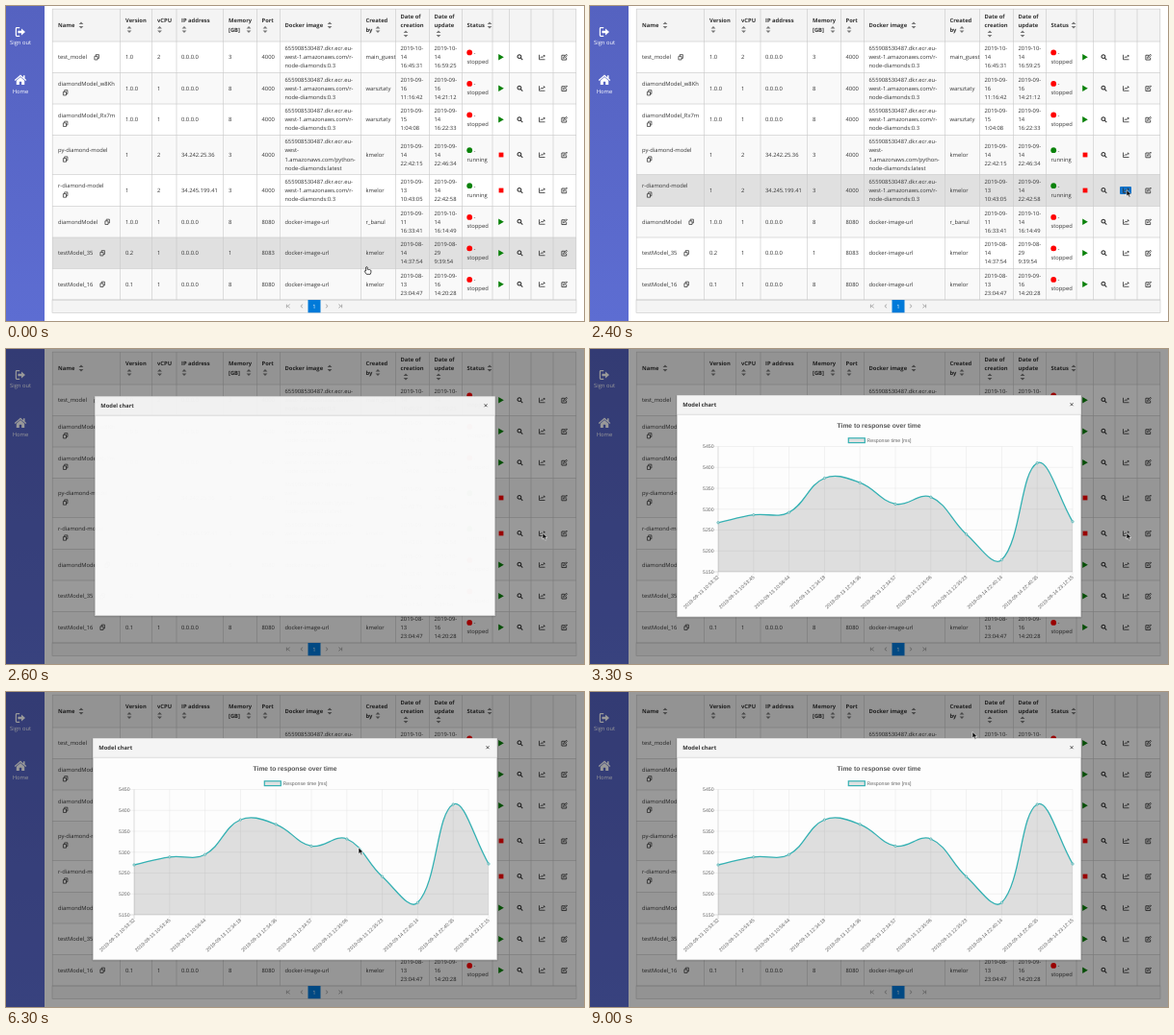
Animation, 600 px wide and 328 px high, one loop 9100 ms. Source, as an HTML page:

```html
<!DOCTYPE html>
<html lang="en">
<head>
<meta charset="utf-8">
<title>Model table and chart</title>
<style>
html, body { margin: 0; width: 600px; height: 328px; overflow: hidden; background: #fff; }
svg { display: block; }
text { font-family: "Open Sans", sans-serif; font-size: 5.8px; fill: #333; text-rendering: geometricPrecision; white-space: pre; }
.b { font-weight: 700; }
.w { fill: #fff; }
.c { text-anchor: middle; }
.e { text-anchor: end; }
.chart text { font-family: "Liberation Sans", Arial, sans-serif; font-size: 5.2px; fill: #666; }
.chart .title { font-size: 6.7px; font-weight: 700; fill: #555; }
.chart .tip text { fill: #fff; }
</style>
</head>
<body>
<svg id="stage" width="600" height="328" viewBox="0 0 600 328">
  <defs>
    <linearGradient id="side" x1="0" y1="0" x2="0" y2="1">
      <stop offset="0" stop-color="#5562c0"/><stop offset="1" stop-color="#5d6dd2"/>
    </linearGradient>
  </defs>
</svg>
<script>
const NS = "http://www.w3.org/2000/svg";
const stage = document.getElementById("stage");
const LOOP = 9100, STEP = 100;
const LINE = "#c8c8c8", INK = "#333", TEAL = "#35b1b3";

function add(parent, tag, attrs = {}, content) {
  const el = document.createElementNS(NS, tag);
  for (const k in attrs) el.setAttribute(k, attrs[k]);
  if (content !== undefined) el.textContent = content;
  parent.appendChild(el);
  return el;
}
const group = (p, a) => add(p, "g", a);
const rect = (p, x, y, width, height, fill, more) => add(p, "rect", { x, y, width, height, fill, ...more });
const line = (p, x1, y1, x2, y2, stroke = LINE, w = 0.6) =>
  add(p, "line", { x1, y1, x2, y2, stroke, "stroke-width": w });
// y is the visual middle of the line of text
const text = (p, x, y, s, cls = "") => add(p, "text", { x, y: y + 2, class: cls }, s);
const lines = (p, x, y, list, cls) =>
  list.forEach((s, i) => text(p, x, y + (i - (list.length - 1) / 2) * 9.1, s, cls));

const ICONS = {
  sort: ["M-2.4-.9 0-3.4 2.4-.9zM-2.4.9 0 3.4 2.4.9z", "#777"],
  copy: ["M-2.1-.9H1V2.7H-2.1zM-.8-.9V-2.6H2.4V1.2H1", INK, 0.75],
  search: ["M-2.5-.6A1.9 1.9 0 1 1 1.3-.6 1.9 1.9 0 1 1-2.5-.6zM.8.8 2.8 2.8", INK, 1.05],
  chart: ["M-3-2.5V2.5H3M-2 1-.5-.6.6.4 2.5-1.7M1.2-1.8H2.5V-.5", INK, 0.8],
  edit: ["M.5-2H-2.6V2.8H2.2V.4M-.9 1.1-.7-.1 2.1-2.9 3-2 .2.8z", INK, 0.85],
  play: ["M-2.8-3.2 2.8 0-2.8 3.2z", "#0a820a"],
  stop: ["M-2.4-2.4H2.4V2.4H-2.4z", "#f00"],
  first: ["M-1.6-1.8V1.8M1.6-1.8-.6 0 1.6 1.8", "#888", 0.7],
  prev: ["M1.1-1.8-1.1 0 1.1 1.8", "#888", 0.7],
  next: ["M-1.1-1.8 1.1 0-1.1 1.8", "#888", 0.7],
  last: ["M1.6-1.8V1.8M-1.6-1.8.6 0-1.6 1.8", "#888", 0.7],
  exit: ["M-.8-4.4H-3.8Q-4.6-4.4-4.6-3.6V3.6Q-4.6 4.4-3.8 4.4H-.8", "#fff", 1.2],
  arrow: ["M-2.6-1.2H1V-3.6L5 0 1 3.6V1.2H-2.6z", "#fff"],
  home: ["M0-5.4 6.2 0 5.4.9 0-3.8-5.4.9-6.2 0zM3-4.8H4.5V-1.5L3-2.8zM-4.2.8 0-2.9 4.2.8V5H1.2V1.8H-1.2V5H-4.2z", "#fff"],
  close: ["M-1.5-1.5 1.5 1.5M1.5-1.5-1.5 1.5", "#555", 1]
};
function icon(p, name, x, y) {
  const [d, color, w] = ICONS[name];
  const paint = w ? { fill: "none", stroke: color, "stroke-width": w } : { fill: color };
  return add(p, "path", { d, transform: `translate(${x} ${y})`, ...paint });
}

// ---- page ----
const page = group(stage);
rect(page, 0, 0, 600, 328, "#fff");
rect(page, 0, 0, 40, 328, "url(#side)");
icon(page, "exit", 15, 27);
icon(page, "arrow", 15, 27);
text(page, 15, 38, "Sign out", "w c");
icon(page, "home", 15, 77);
text(page, 15, 89, "Home", "w c");

const HEAD = [
  [54, ["Name"], 78, 20], [124, ["Version", ""], 128, 24.5], [157, ["vCPU", ""], 159.5, 24.5],
  [182, ["IP address", ""], 185, 24.5], [231, ["Memory", "[GB]"], 252, 24.5], [265.5, ["Port", ""], 269, 24.5],
  [289.5, ["Docker image"], 336, 20], [373.5, ["Created", "by"], 386, 24.5],
  [409.5, ["Date of", "creation", ""], 415, 29], [444.5, ["Date of", "update", ""], 449, 29],
  [478.5, ["Status"], 502, 20]
];
const REPO = ["655908530487.dkr.ecr.eu-", "west-1.amazonaws.com/r-", "node-diamonds:0.3"];
const PY = ["655908530487.dkr.ecr.eu-", "west-", "1.amazonaws.com/python-", "node-diamonds:latest"];
const URL_ONLY = ["docker-image-url"];
// name, copy icon x (0 = below), version, vCPU, IP, memory, port, image, author, created, updated, running
const ROWS = [
  ["test_model", 94, "1.0", 2, "0.0.0.0", 3, 4000, REPO, "main_guest", "2019-10- 14 16:45:31", "2019-10- 14 16:59:25"],
  ["diamondModel_w8Kh", 0, "1.0.0", 1, "0.0.0.0", 8, 4000, REPO, "warsztaty", "2019-09- 16 11:16:42", "2019-09- 16 14:21:12"],
  ["diamondModel_Rx7m", 0, "1.0.0", 1, "0.0.0.0", 8, 4000, REPO, "warsztaty", "2019-09- 15 1:04:08", "2019-09- 14 16:22:33"],
  ["py-diamond-model", 0, "1", 2, "34.242.25.36", 3, 4000, PY, "kmelor", "2019-09- 14 22:42:15", "2019-09- 14 22:46:34", true],
  ["r-diamond-model", 0, "1", 2, "34.245.199.41", 3, 4000, REPO, "kmelor", "2019-09- 13 10:43:05", "2019-09- 14 22:42:58", true],
  ["diamondModel", 105, "1.0.0", 1, "0.0.0.0", 8, 8080, URL_ONLY, "r_banul", "2019-09- 11 16:33:41", "2019-10- 14 16:14:49"],
  ["testModel_35", 100, "0.2", 1, "0.0.0.0", 1, 8083, URL_ONLY, "kmelor", "2019-08- 14 14:37:54", "2019-08- 29 9:39:54"],
  ["testModel_16", 100, "0.1", 1, "0.0.0.0", 8, 8080, URL_ONLY, "kmelor", "2019-08- 13 23:04:47", "2019-09- 16 14:20:28"]
];
const EDGES = [37, 69.5, 102, 134.5, 175.5, 208.5, 241, 273.5, 306];
const COLS = [48.3, 118.5, 151.5, 177, 225.5, 260.5, 284.5, 368.5, 404.5, 439.5, 473.5, 505, 522.5, 545, 568, 591.7];

rect(page, 48, 3, 544, 34, "#f4f4f4");
const bands = ROWS.map((r, i) => rect(page, 48, EDGES[i], 544, EDGES[i + 1] - EDGES[i], "#fff"));
const button = rect(page, 550, 188, 12, 8, "#1272c8", { rx: 1 });
rect(page, 48, 306, 544, 13.3, "#f4f4f4", { stroke: LINE, "stroke-width": 0.6 });
COLS.forEach(x => line(page, x, 3, x, 306));
[3.2, ...EDGES].forEach(y => line(page, 48, y, 592, y));

for (const [x, words, ix, iy] of HEAD) {
  lines(page, x, 20, words, "b");
  icon(page, "sort", ix, iy);
}
ROWS.forEach(([name, copyX, ver, cpu, ip, mem, port, image, who, made, changed, on], i) => {
  const y = (EDGES[i] + EDGES[i + 1]) / 2;
  lines(page, 54, y, copyX ? [name] : [name, ""]);
  icon(page, "copy", copyX || 61.5, copyX ? y : y + 4.5);
  [[124, ver], [157, cpu], [182, ip], [231, mem], [265.5, port], [373.5, who]]
    .forEach(([x, s]) => text(page, x, y, s));
  lines(page, 289.5, y, image);
  lines(page, 409.5, y, made.split(" "));
  lines(page, 444.5, y, changed.split(" "));
  add(page, "circle", { cx: 481.2, cy: y - 4.8, r: 2.9, fill: on ? "#0a820a" : "#f00" });
  lines(page, 478.5, y, ["", on ? "running" : "stopped"]);
  text(page, 485.6, y - 4.5, "-");
  icon(page, on ? "stop" : "play", 514, y);
  icon(page, "search", 533.5, y);
  icon(page, "chart", 556.5, y);
  icon(page, "edit", 579.5, y);
});
icon(page, "first", 293, 312.5);
icon(page, "prev", 307, 312.5);
rect(page, 313.5, 306, 13, 13.3, "#007ad9");
text(page, 320, 312.5, "1", "w c");
icon(page, "next", 333, 312.5);
icon(page, "last", 347, 312.5);

// ---- dialog ----
const mask = rect(stage, 0, 0, 600, 328, "#000", { opacity: 0.4 });
const dialog = group(stage);
rect(dialog, 89.5, 48, 421, 232.5, "#000", { opacity: 0.15, rx: 1 });
rect(dialog, 90.3, 48.3, 419.4, 230.6, "#fdfdfd", { stroke: LINE, "stroke-width": 0.6 });
rect(dialog, 90.6, 48.6, 418.8, 19.6, "#f4f4f4");
line(dialog, 90, 68.3, 510, 68.3);
text(dialog, 96.3, 58.2, "Model chart", "b");
icon(dialog, "close", 500, 57.7);

const chart = group(dialog, { class: "chart" });
const LEFT = 133, RIGHT = 501, TOP = 101.5, BASE = 232;
const STAMPS = ["13 10:53:32", "13 10:53:45", "13 10:56:44", "13 12:34:18", "13 12:34:36", "13 12:34:57",
  "13 12:35:06", "13 12:35:23", "14 22:40:14", "14 22:40:35", "14 23:12:15"];
const LEVELS = [180, 171.8, 169.2, 133, 137.8, 160.4, 153, 192.2, 219.3, 117, 179];
const px = i => LEFT + i * (RIGHT - LEFT) / 10;

text(chart, 300, 80, "Time to response over time", "title c");
rect(chart, 268.3, 92.8, 17, 4.8, "#e0e0e0", { stroke: TEAL, "stroke-width": 1.2 });
text(chart, 287.6, 95, "Response time [ms]");
for (let i = 0; i < 7; i++) {
  const y = TOP + i * (BASE - TOP) / 6;
  line(chart, 129, y, RIGHT, y, i === 6 ? "#bbb" : "#e4e4e4", 0.5);
  text(chart, 128.6, y - 0.2, 5450 - i * 50, "e");
}
STAMPS.forEach((s, i) => {
  line(chart, px(i), TOP, px(i), BASE + 4.3, i ? "#e4e4e4" : "#bbb", 0.5);
  add(chart, "text", { class: "e", y: 1.8, transform: `translate(${px(i)} 236.6) rotate(-43)` }, "2019-09-" + s);
});
const area = add(chart, "path", { fill: "#000", "fill-opacity": 0.12 });
const curve = add(chart, "path", { fill: "none", stroke: TEAL, "stroke-width": 1.3 });
const dots = LEVELS.map((v, i) =>
  add(chart, "circle", { cx: px(i), r: 1.2, fill: "#cfdada", stroke: TEAL, "stroke-width": 0.6 }));

const tip = group(chart, { class: "tip" });
rect(tip, 281, 143.7, 69, 18.6, "#000", { rx: 2.5, opacity: 0.8 });
add(tip, "path", { d: "M350 150.8 352.4 153 350 155.2z", opacity: 0.8 });
text(tip, 283.5, 149.2, "2019-09-13 12:35:06", "b");
rect(tip, 283.8, 154.6, 4.4, 4.4, "#e0e0e0", { stroke: TEAL, "stroke-width": 0.5 });
text(tip, 290, 156.8, "Response time [ms]: 5331");

// cubic spline with tension, handles kept inside the plot
function spline(pts, tension = 0.4) {
  const cap = y => Math.min(BASE, Math.max(TOP, y));
  const handles = pts.map((p, i) => {
    const a = pts[i - 1] || p, b = pts[i + 1] || p;
    const da = Math.hypot(p[0] - a[0], p[1] - a[1]), db = Math.hypot(b[0] - p[0], b[1] - p[1]);
    const at = k => [p[0] + k * (b[0] - a[0]), cap(p[1] + k * (b[1] - a[1]))];
    return [at(-tension * da / (da + db)), at(tension * db / (da + db))];
  });
  return pts.map((p, i) => i ? `C${handles[i - 1][1]} ${handles[i][0]} ${p}` : `M${p}`).join("");
}
function plot(k) {
  const pts = LEVELS.map((v, i) => [px(i), BASE + (v - BASE) * k]);
  const d = spline(pts);
  curve.setAttribute("d", d);
  area.setAttribute("d", `${d}L${RIGHT} ${BASE}L${LEFT} ${BASE}Z`);
  dots.forEach((c, i) => c.setAttribute("cy", pts[i][1]));
}

// ---- pointer ----
const pointer = group(stage);
const arrow = add(pointer, "path", {
  d: "M0 0V6.6L1.6 5.2 2.7 7.7 3.9 7.2 2.8 4.8H4.9z", fill: "#000", stroke: "#fff", "stroke-width": 0.6
});
const hand = add(pointer, "path", {
  d: "M-.9.2Q0-.8.7.2V2.5Q1.6 2 2.1 2.8 3 2.3 3.4 3.1 4.4 2.9 4.4 4V5.5L3.7 7.5H-.2L-2.2 4.7Q-2.3 3.4-.9 4.2z",
  fill: "#fff", stroke: "#000", "stroke-width": 0.7, "stroke-linejoin": "round"
});
// time, x, y
const PATH = [
  [0, 374.5, 271.8], [1000, 512, 205], [1100, 513.5, 204.5], [1300, 513.5, 204.5], [2000, 557, 191.5],
  [3300, 557, 191.5], [4000, 414, 206], [4400, 399, 189], [5200, 399, 189], [5600, 392, 194],
  [6300, 366, 162], [6600, 355, 153.5], [8200, 355, 153.5], [9000, 397, 41.5], [LOOP, 397, 41.5]
];
const clamp = v => Math.min(1, Math.max(0, v));
const ramp = (t, a, b) => clamp((t - a) / (b - a));
const smooth = p => p * p * (3 - 2 * p);

function position(t) {
  const i = PATH.findIndex((k, n) => n && t <= k[0]);
  const a = PATH[i - 1], b = PATH[i], p = smooth(ramp(t, a[0], b[0]));
  return [a[1] + (b[1] - a[1]) * p, a[2] + (b[2] - a[2]) * p];
}
// cubic-bezier(0, 0, .2, 1)
function decelerate(x) {
  let lo = 0, hi = 1;
  for (let n = 0; n < 20; n++) {
    const s = (lo + hi) / 2;
    if (0.6 * s * s * (1 - s) + s ** 3 < x) lo = s; else hi = s;
  }
  return 3 * lo * lo * (1 - lo) + lo ** 3;
}
const show = (el, on) => { el.style.display = on ? "" : "none"; };

const OPEN = 2486, DRAW = 2650, OVER = 1900;
function render(t) {
  const [x, y] = position(t);
  const open = t >= OPEN;
  pointer.setAttribute("transform", `translate(${x} ${y})`);
  show(hand, t < OVER);
  show(arrow, t >= OVER);
  bands.forEach((b, i) => {
    const over = !open && y >= EDGES[i] && y < EDGES[i + 1];
    b.setAttribute("fill", over ? "#e0e0e0" : i % 2 ? "#f9f9f9" : "#fff");
  });
  show(button, t >= OVER && !open);
  show(mask, open);
  show(dialog, open);
  const k = decelerate(ramp(t, OPEN, OPEN + 150));
  const s = 0.7 + 0.3 * k;
  dialog.setAttribute("opacity", k);
  dialog.setAttribute("transform", `translate(300 163.6) scale(${s}) translate(-300 -163.6)`);
  show(chart, t >= DRAW);
  plot(1 - (1 - ramp(t, DRAW, DRAW + 1000)) ** 4);
  tip.setAttribute("opacity", ramp(t, 6500, 6800) * (1 - ramp(t, 8200, 8500)));
}
function tick() {
  render(Math.floor(performance.now() % LOOP / STEP) * STEP);
  requestAnimationFrame(tick);
}
tick();
</script>
</body>
</html>
```
